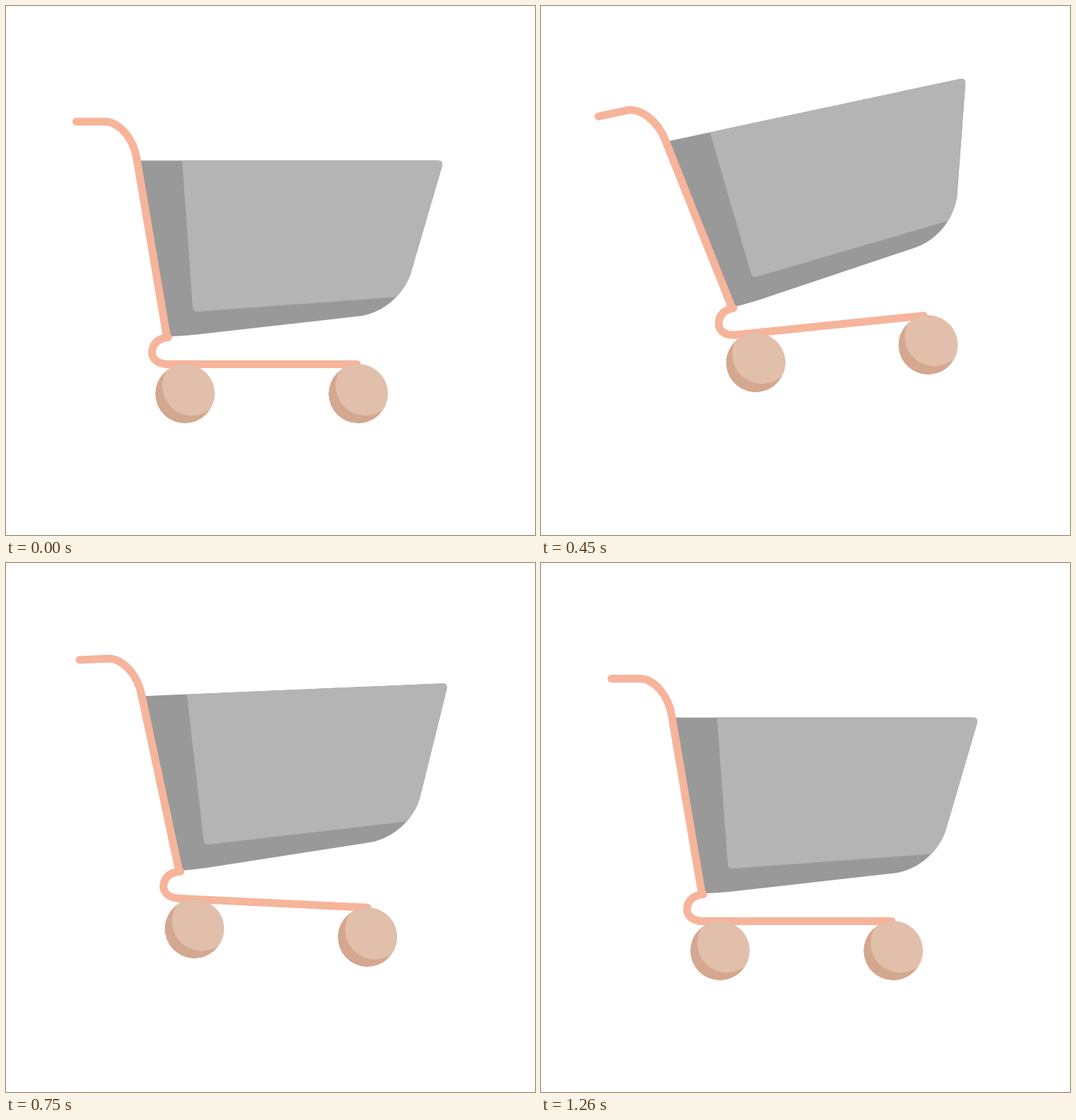
Animation, 748 px wide and 748 px high, one loop 3290 ms. Source, as an HTML page:

```html
<!DOCTYPE html>
<html lang="en">
<head>
<meta charset="utf-8">
<title>Hopping cart</title>
<style>
  html, body { margin: 0; width: 100%; height: 100%; overflow: hidden; background: #fff; }
  svg { display: block; width: 100%; height: 100%; }
  .tube { fill: none; stroke: #f6b49b; stroke-width: 11; stroke-linecap: round; stroke-linejoin: round; }
</style>
</head>
<body>
<svg viewBox="0 0 748 748">
  <defs>
    <path id="basket" d="M187 218.5H611Q618.5 218.5 616.5 227L572 379C562 408 534 434 500 438.5L270 464.5Q245 467 229 467Z"/>
    <clipPath id="inBasket"><use href="#basket"/></clipPath>
    <clipPath id="inWheel"><circle r="42"/></clipPath>
    <g id="wheel" clip-path="url(#inWheel)">
      <circle r="42" fill="#d4a78f"/>
      <circle cx="10" cy="-11" r="42" fill="#e2bfab"/>
    </g>
  </defs>
  <g id="upper">
    <use href="#basket" fill="#999"/>
    <g clip-path="url(#inBasket)">
      <path fill="#b4b4b4" d="M249 218H640V405L271 432Q264.5 432.5 264 426Z"/>
    </g>
    <path class="tube" d="M99.5 163.5H139C160 163.5 180.5 187 185 217L227.5 468"/>
  </g>
  <g id="lower">
    <path class="tube" d="M229.5 468.5C212 470 206.5 481 206.5 490C206.5 500 216 506.5 229 506.5H496"/>
    <use href="#wheel" x="253" y="548.3"/>
    <use href="#wheel" x="498" y="548.3"/>
  </g>
</svg>
<script>
const LOOP = 3290, STEP = 30, END = 1260;
const PIVOT = [229, 468];
const upper = document.getElementById('upper');
const lower = document.getElementById('lower');

const progress = (t, from, to) => Math.min(Math.max((t - from) / (to - from), 0), 1);
const smooth = u => u * u * (3 - 2 * u);

// Swings from rest through the turning points [time, value], easing in and out of each.
const swing = (t, turns) => turns.reduce(([from, last, sum], [to, value]) =>
  [to, value, sum + (value - last) * smooth(progress(t, from, to))], [0, 0, 0])[2];

// Rolls out quickly, then drifts back.
const roll = t => 48 * Math.sin(Math.PI / 2 * progress(t, 0, 395))
  * (1 - progress(t, 395, 1130)) ** 1.55;

// Three hops, each with its top and its landing.
const hop = t => swing(t, [[425, -43.5], [606, 0], [780, -35], [975, 0], [1110, -3], [END, 0]]);

const basketTilt = t => swing(t,
  [[125, 3.3], [412, -13.5], [643, 6.3], [785, -4], [960, 2], [1080, 0]]);
const railTilt = t => swing(t, [[375, -7.1], [715, 3], [930, 0]]);

function draw(time) {
  const t = Math.min(Math.floor(time % LOOP / STEP) * STEP, END);
  const pose = angle => `translate(${roll(t)} ${hop(t)}) rotate(${angle} ${PIVOT})`;
  upper.setAttribute('transform', pose(basketTilt(t)));
  lower.setAttribute('transform', pose(railTilt(t)));
}

const start = performance.now();
function tick() {
  draw(performance.now() - start);
  requestAnimationFrame(tick);
}
tick();
</script>
</body>
</html>
```
